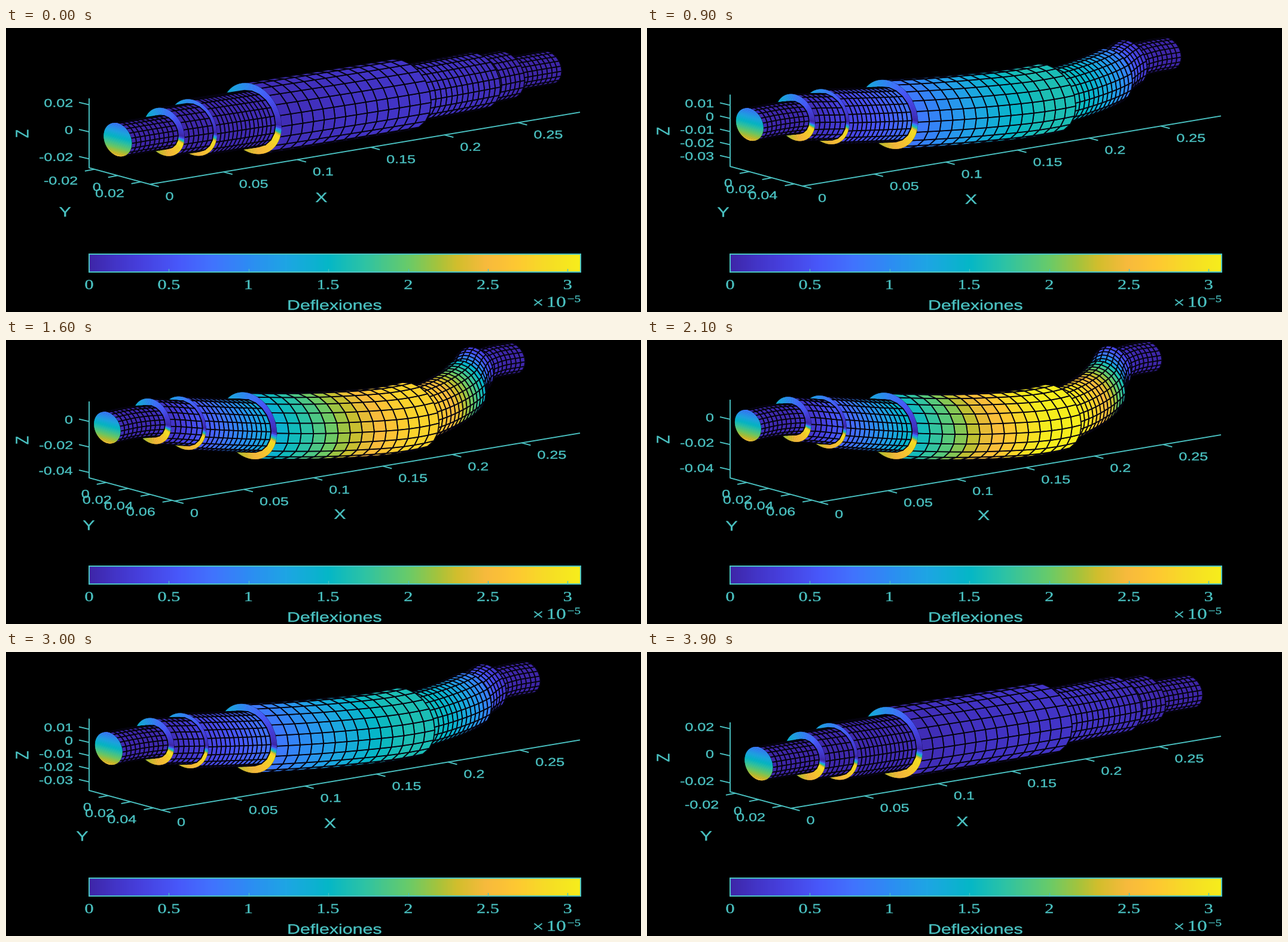
A matplotlib script that plays this animation: 1062x476 px, repeating every 4000 ms.

```python
import numpy as np
import matplotlib.pyplot as plt
from matplotlib.animation import FuncAnimation
from matplotlib.collections import LineCollection, PolyCollection
from matplotlib.colors import LinearSegmentedColormap
from matplotlib.patches import PathPatch, Rectangle
from matplotlib.textpath import TextPath
from matplotlib.transforms import Affine2D

W, H, DPI = 1062, 476, 100
PX = 72 / DPI
STEPS = 20
CYAN = "#4ac2c2"
SANS, SERIF = "Liberation Sans", "Liberation Serif"
ASPECT = 1.32  # the whole picture is wider than its natural proportions

LEFT, RIGHT, MIDDLE = 139, 960, 129.5
X_DIR = np.array([2472, -415])
Y_DIR = np.array([1950, 530])
Z_DIR = np.array([0, -2275])

PARULA = LinearSegmentedColormap.from_list("parula", [
    (0, "#3e26a8"), (0.05, "#4234c6"), (0.1, "#463fdc"), (0.18, "#4858fa"),
    (0.25, "#4173fe"), (0.325, "#2d8cf3"), (0.4, "#1ea5e4"), (0.487, "#05b7c7"),
    (0.56, "#2dc3a5"), (0.65, "#69cb69"), (0.71, "#a5c33c"), (0.75, "#d2be2d"),
    (0.81, "#f8ba3d"), (0.87, "#fec832"), (0.93, "#f7dc26"), (1, "#f6ee1c")])

# shaft: section borders, radii and mesh columns
LENGTH = 0.292
BORDERS = [0, 0.0315, 0.051, 0.0903, 0.191, 0.243, 0.2625, LENGTH]
RADII = [0.012, 0.0173, 0.0203, 0.0255, 0.0203, 0.0173, 0.012]
COLUMNS = [10, 6, 14, 14, 14, 6, 9]
AROUND = np.linspace(0, 2 * np.pi, 21)

# deflection at full amplitude
KNOTS = np.array([0, .015, .031, .0505, .0903, .14, .175, .191,
                  .215, .243, .2625, .275, LENGTH])
Y_KNOTS = np.array([.001, .0005, .0018, .0068, .0183, .0350, .0432, .0426,
                    .0365, .0215, .0042, .0005, .0003])
Z_KNOTS = -np.array([.0012, .0006, .0018, .0065, .0148, .0207, .022, .0214,
                     .018, .0112, .003, .0004, 0])
FULL_SCALE = 0.0457  # deflection shown in the last colour


def hermite(x, values):
    """Smooth curve through the knots."""
    slopes = np.gradient(values, KNOTS)
    i = np.clip(np.searchsorted(KNOTS, x, side="right") - 1, 0, len(KNOTS) - 2)
    h = KNOTS[i + 1] - KNOTS[i]
    t = (x - KNOTS[i]) / h
    return ((1 + 2 * t) * (1 - t) ** 2 * values[i] + t * (1 - t) ** 2 * h * slopes[i]
            + t * t * (3 - 2 * t) * values[i + 1] + t * t * (t - 1) * h * slopes[i + 1])


def deflection(x):
    x = np.asarray(x, float)
    return hermite(x, Y_KNOTS), hermite(x, Z_KNOTS)


class View:
    """Axis limits and equal-scale projection for one amplitude."""

    def __init__(self, amp):
        lows, highs = [], []
        for start, end, r in zip(BORDERS, BORDERS[1:], RADII):
            centre = amp * np.array(deflection(np.linspace(start, end, 30)))
            lows.append(centre.min(axis=1) - r)
            highs.append(centre.max(axis=1) + r)
        self.amp = amp
        self.ylo, self.zlo = np.min(lows, axis=0)
        self.yhi, self.zhi = np.max(highs, axis=0)
        ly, lz = self.yhi - self.ylo, self.zhi - self.zlo
        self.k = (RIGHT - LEFT) / (X_DIR[0] * LENGTH + Y_DIR[0] * ly)
        height = self.k * (-X_DIR[1] * LENGTH + Y_DIR[1] * ly - Z_DIR[1] * lz)
        self.corner = np.array([LEFT, MIDDLE + height / 2 - self.k * Y_DIR[1] * ly])

    def project(self, x, y, z):
        x, y, z = (np.asarray(v, float)[..., None] for v in (x, y, z))
        return self.corner + self.k * (x * X_DIR + (y - self.ylo) * Y_DIR
                                       + (z - self.zlo) * Z_DIR)

    def circle(self, x, r, angle):
        y, z = deflection(x)
        return self.project(x, self.amp * y + r * np.cos(angle),
                            self.amp * z + r * np.sin(angle))


def section_quads(view, start, end, r, columns):
    x = np.linspace(start, end, columns + 1)
    p = view.circle(x[:, None], r, AROUND[None, :])
    level = view.amp * np.hypot(*deflection((x[1:] + x[:-1]) / 2)) / FULL_SCALE
    for i in reversed(range(columns)):
        for j in range(len(AROUND) - 1):
            quad = np.array([p[i, j], p[i + 1, j], p[i + 1, j + 1], p[i, j + 1]])
            d1, d2 = quad[2] - quad[0], quad[3] - quad[1]
            if d1[0] * d2[1] - d1[1] * d2[0] < 0:  # faces the viewer
                yield quad, PARULA(level[i]), True


def ring_quads(view, x, inner, outer):
    angle = np.linspace(0, 2 * np.pi, 121)
    a, b = view.circle(x, inner, angle), view.circle(x, outer, angle)
    for i in range(120):
        turn = (i + 0.5) / 120
        value = turn ** 0.9 if turn < 0.95 else 0.95 * (1 - turn) / 0.05
        yield np.array([a[i], b[i], b[i + 1], a[i + 1]]), PARULA(value), False


def disc_quads(view):
    angle = np.linspace(-np.pi / 2, np.pi / 2, 37)
    right = view.circle(0, RADII[0], angle)
    left = view.circle(0, RADII[0], np.pi - angle)
    for i in range(36):
        value = 0.53 - 0.26 * np.sin((angle[i] + angle[i + 1]) / 2)
        yield np.array([left[i], right[i], right[i + 1], left[i + 1]]), PARULA(value), False


def shaft(view):
    faces = []
    for i in reversed(range(len(RADII))):
        faces += section_quads(view, BORDERS[i], BORDERS[i + 1], RADII[i], COLUMNS[i])
        if i and RADII[i] > RADII[i - 1]:
            faces += ring_quads(view, BORDERS[i], RADII[i - 1], RADII[i])
    faces += disc_quads(view)
    quads, colors, meshed = zip(*faces)
    return PolyCollection(
        quads, facecolors=colors, zorder=3,
        edgecolors=[(0.02, 0.01, 0.06) if m else c for c, m in zip(colors, meshed)],
        linewidths=[1.8 * PX if m else 0.5 * PX for m in meshed])


def label(x, y, s, size=19, anchor=0.5, family=SANS, turn=0):
    """Text whose box is centred on y, and placed on x by its anchor fraction."""
    path = TextPath((0, 0), s, size=size, prop={"family": family})
    box = path.get_extents()
    place = (Affine2D().translate(-box.x0 - anchor * box.width, -(box.y0 + box.y1) / 2)
             .rotate_deg(turn).scale(ASPECT, -1).translate(x, y))
    return ax.add_patch(PathPatch(place.transform_path(path), fc=CYAN, ec=CYAN,
                                  lw=0.4 * PX, zorder=4))


def ticks(low, high):
    for step in (0.02, 0.01):
        n = np.arange(np.ceil(low / step), np.floor(high / step) + 1)
        if len(n) >= 3:
            break
    return n * step


def draw_axes(view):
    ylo, yhi, zlo, zhi = view.ylo, view.yhi, view.zlo, view.zhi
    corner = view.project(0, ylo, zlo)
    front = view.project(0, yhi, zlo)
    top = view.project(0, ylo, zhi)
    lines = [[top, corner, front, view.project(LENGTH, yhi, zlo)]]
    artists = []

    def tick(point, direction, offset, value, anchor):
        lines.append([point, point + direction])
        artists.append(label(*(point + offset), f"{value + 0.0:.2g}", anchor=anchor))

    for x in np.arange(6) * 0.05:
        tick(view.project(x, yhi, zlo), (15, 4), (27, 20), x, 0)
    for y in ticks(ylo, yhi):
        tick(view.project(0, y, zlo), (-16, 3), (-29, 19), y, 1)
    for z in ticks(zlo, zhi):
        tick(view.project(0, ylo, z), (-17, -4), (-28, -3), z, 1)

    mid = (corner + front) / 2
    shift = 91 if ylo <= -0.02 else 72
    artists += [
        label(527 + 0.75 * (front[0] - 240), front[1] + 22, "X", 23),
        label(mid[0] - shift, mid[1] + 60, "Y", 23),
        label(27, (corner[1] + top[1]) / 2 + 1, "Z", 23, turn=90),
        ax.add_collection(LineCollection(lines, colors=CYAN, linewidths=1.9 * PX, zorder=2)),
    ]
    return artists


def draw_colorbar():
    ax.imshow(np.linspace(0, 1, 256)[None, :], cmap=PARULA, aspect="auto",
              extent=(LEFT, 961, 409, 379), interpolation="nearest")
    ax.add_patch(Rectangle((LEFT, 379), 822, 30, fill=False, ec=CYAN, lw=2 * PX, zorder=3))
    for i in range(7):
        x = LEFT + 133.4 * i
        ax.plot([x, x], [404, 409], color=CYAN, lw=1.3 * PX)
        label(x, 430, f"{i / 2:g}", 23, family=SERIF)
    label(890, 460, "×", 26, family=SERIF)
    label(921, 459, "10", 25, family=SERIF)
    label(950, 454, "−5", 16, family=SERIF)
    label(550, 464, "Deflexiones", 23)


fig = plt.figure(figsize=(W / DPI, H / DPI), dpi=DPI, facecolor="black")
ax = fig.add_axes([0, 0, 1, 1])
ax.axis("off")
draw_colorbar()
ax.set_xlim(0, W)
ax.set_ylim(H, 0)
ax.set_autoscale_on(False)
moving = []


def update(frame):
    while moving:
        moving.pop().remove()
    step = min(frame, 2 * STEPS - 1 - frame)
    view = View((step + 1) / STEPS)
    moving.extend(draw_axes(view))
    moving.append(ax.add_collection(shaft(view)))
    return moving


anim = FuncAnimation(fig, update, frames=2 * STEPS, interval=100,
                     init_func=lambda: [], repeat=True, repeat_delay=0, blit=False)
plt.show()
```
